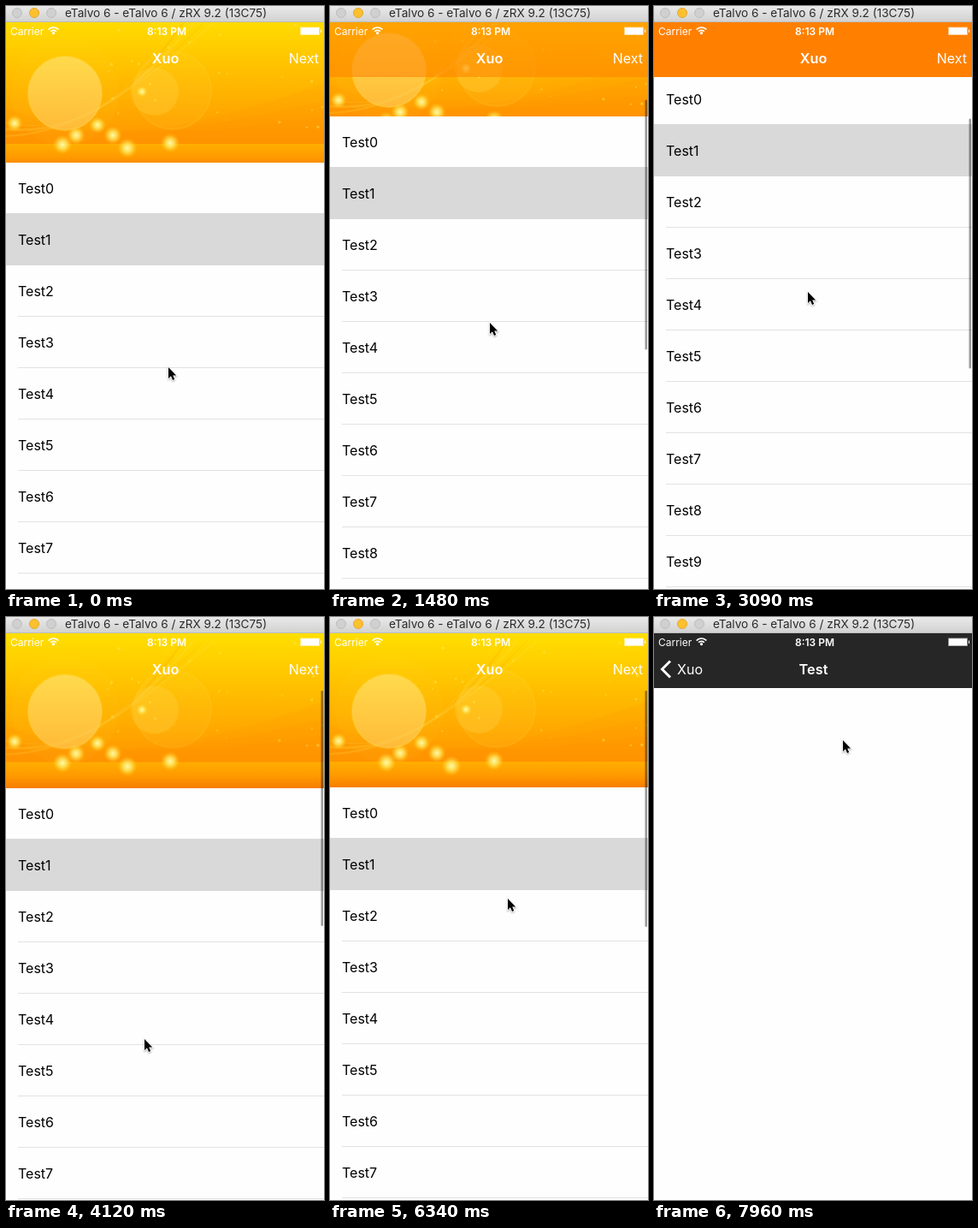
Animation of 372x681 px, one loop 8000 ms. Source, as an HTML page with a canvas:

```html
<!DOCTYPE html>
<html lang="en">
<head>
<meta charset="utf-8">
<title>Stretchy header list</title>
<style>
  html, body { margin: 0; width: 100%; height: 100%; overflow: hidden; background: #fefefe; }
  canvas { display: block; }
</style>
</head>
<body>
<canvas id="stage" width="372" height="681"></canvas>
<script>
const W = 372, H = 681, LOOP = 8000, STEP = 147.3;
const STATUS_TOP = 19, BAR_BOTTOM = 83, REST_TOP = 183, ROW = 60, ROWS = 20;
const FONT = 'Inter, Roboto, sans-serif';
const ctx = document.getElementById('stage').getContext('2d');

// The turning points of the gestures; everything eases from one to the next.
const POSES = [
  { time: 0, top: REST_TOP, x: 190, y: 422 },
  { time: 1480, top: 129, x: 187, y: 370 },
  { time: 3090, top: 79, x: 180, y: 334 },
  { time: 4120, top: 200, x: 162, y: 493 },
  { time: 5600, top: -400, x: 191, y: 216 },
  { time: 6340, top: 199, x: 208, y: 329 },
  { time: 7050, top: REST_TOP, x: 348, y: 62 },
  { time: LOOP - 40, top: REST_TOP, x: 221, y: 144 },
];

const clamp = v => Math.min(1, Math.max(0, v));
const ease = (t, from, to) => {
  const u = clamp((t - from) / (to - from));
  return u * u * (3 - 2 * u);
};

function poseAt(t) {
  const next = Math.max(1, POSES.findIndex(p => p.time > t));
  const b = t >= LOOP - 40 ? POSES[POSES.length - 1] : POSES[next];
  const a = POSES[POSES.indexOf(b) - 1];
  const k = ease(t, a.time, b.time);
  const mix = key => Math.round(a[key] + (b[key] - a[key]) * k);
  return { top: mix('top'), x: mix('x'), y: mix('y') };
}

function text(str, x, y, size, color, weight = 400, align = 'left') {
  ctx.font = `${weight} ${size}px ${FONT}`;
  ctx.textAlign = align;
  ctx.fillStyle = color;
  ctx.fillText(str, x, y);
}

function rect(x, y, w, h, fill) {
  ctx.fillStyle = fill;
  ctx.fillRect(x, y, w, h);
}

function disc(c, x, y, r, fill, stroke) {
  c.beginPath();
  c.arc(x, y, r, 0, 7);
  c.fillStyle = fill;
  c.fill();
  if (stroke) { c.strokeStyle = stroke; c.stroke(); }
}

function verticalGradient(c, from, to, ...colors) {
  const g = c.createLinearGradient(0, from, 0, to);
  colors.forEach((color, i) => g.addColorStop(i / (colors.length - 1), color));
  return g;
}

function glow(c, x, y, r) {
  const g = c.createRadialGradient(x, y, 0, x, y, r);
  g.addColorStop(0, 'rgba(255,255,180,.95)');
  g.addColorStop(.45, 'rgba(255,236,100,.75)');
  g.addColorStop(1, 'rgba(255,205,30,0)');
  disc(c, x, y, r, g);
}

const IMAGE_TOP = -20, HORIZON = 161, IMAGE_BOTTOM = 193;
const header = makeHeader();

function makeHeader() {
  const image = document.createElement('canvas');
  image.width = W;
  image.height = IMAGE_BOTTOM - IMAGE_TOP;
  const c = image.getContext('2d');
  c.translate(0, -IMAGE_TOP);
  c.fillStyle = verticalGradient(c, 5, HORIZON, '#ffe200', '#ffc800', '#ffaf00', '#ff9500');
  c.fillRect(0, IMAGE_TOP, W, HORIZON - IMAGE_TOP);
  c.fillStyle = verticalGradient(c, HORIZON, IMAGE_BOTTOM, '#ffae00', '#ff9a00', '#f57a00');
  c.fillRect(0, HORIZON, W, IMAGE_BOTTOM - HORIZON);

  // Swells rising to the right, darker with each layer
  for (let i = 0; i < 3; i++) {
    c.fillStyle = 'rgba(255,138,0,.13)';
    c.beginPath();
    c.moveTo(0, 118 + i * 14);
    c.bezierCurveTo(120, 170 - i * 10, 230, 140 + i * 5, W, 90 + i * 20);
    c.lineTo(W, HORIZON);
    c.lineTo(0, HORIZON);
    c.fill();
  }

  // Rays sweeping up from the left
  for (let i = 0; i < 5; i++) {
    c.strokeStyle = i % 2 ? 'rgba(240,150,0,.2)' : 'rgba(255,225,80,.2)';
    c.lineWidth = 1 + i % 3;
    c.beginPath();
    c.moveTo(0, 136 + i * 4);
    c.bezierCurveTo(70, 150, 135, 128 - i * 4, 195 + i * 12, 20);
    c.stroke();
  }

  // Sun and lens rings
  c.lineWidth = 2;
  disc(c, 69, 100, 63, 'rgba(255,220,60,.06)');
  disc(c, 69, 102, 43, verticalGradient(c, 59, 145, 'rgba(255,222,95,.8)', 'rgba(255,200,85,.65)'),
    'rgba(255,215,80,.4)');
  disc(c, 195, 99, 45, 'rgba(255,210,60,.12)', 'rgba(255,220,90,.12)');
  disc(c, 174, 100, 28, 'rgba(255,215,80,.28)');

  // Lights grow towards the horizon
  [[159, 100], [107, 139], [125, 151], [82, 151], [66, 162], [142, 166], [192, 160], [10, 137]]
    .forEach(([x, y]) => glow(c, x, y, 7 + (y - 100) / 14));

  let seed = 11;
  const random = () => (seed = seed * 16807 % 2147483647) / 2147483647;
  for (let i = 0; i < 30; i++) {
    disc(c, 120 + random() * 250, 22 + random() * 120, .5 + random() * 1.5,
      'rgba(255,232,90,.45)');
  }
  return image;
}

function drawList(top, barOpacity) {
  if (top > STATUS_TOP) {
    ctx.save();
    ctx.beginPath();
    ctx.rect(0, STATUS_TOP, W, top - STATUS_TOP);
    ctx.clip();
    ctx.drawImage(header, 0, IMAGE_TOP + (top - REST_TOP) / 2);
    ctx.restore();
  }
  for (let i = 0; i < ROWS; i++) {
    const y = top + i * ROW;
    if (i === 1) rect(0, y - 1, W, ROW + 1, '#d9d9d9');
    else if (i > 1) rect(14, y + ROW - 1, W - 14, 1, '#e2e2e4');
    text('Test' + i, 14, y + 36, 16, '#000');
  }
  const scrolled = REST_TOP - top;
  ctx.fillStyle = `rgba(0,0,0,${.4 * barOpacity})`;
  ctx.beginPath();
  ctx.roundRect(368.5, 86 + Math.max(0, scrolled) * .437, 2.5, 292 + Math.min(0, scrolled), 1.25);
  ctx.fill();
}

function drawStatus() {
  text('Carrier', 5, 33.5, 12, '#fff');
  ctx.strokeStyle = '#fff';
  ctx.lineWidth = 1.7;
  for (const r of [4.4, 7.7]) {
    ctx.beginPath();
    ctx.arc(55.5, 32.7, r, -Math.PI * .77, -Math.PI * .23);
    ctx.stroke();
  }
  disc(ctx, 55.5, 31.7, 1.6, '#fff');
  text('8:13 PM', 188, 33.5, 12, '#fff', 600, 'center');
  rect(344, 24.5, 23, 9.5, 'rgba(255,255,255,.5)');
  rect(345, 25.3, 21, 8, '#fff');
  rect(368, 27.5, 1, 3.5, '#fff');
}

function drawNavigation(push) {
  ctx.globalAlpha = 1 - push;
  text('Xuo', 186.5 - push * 130, 67, 16.3, '#fff', 600, 'center');
  text('Next', 366, 67, 16, '#fff', 400, 'right');
  ctx.globalAlpha = push;
  ctx.strokeStyle = '#fff';
  ctx.lineWidth = 3;
  ctx.stroke(new Path2D('M19 51.5L9.5 61L19 70.5'));
  text('Xuo', 27 + (1 - push) * 130, 67, 16, '#fff');
  text('Test', 186.5 + (1 - push) * 150, 67, 16.3, '#fff', 600, 'center');
  ctx.globalAlpha = 1;
}

function drawWindowBar() {
  rect(0, 0, W, 18, verticalGradient(ctx, 0, 18, '#e9e9e9', '#d2d2d2'));
  rect(0, 18, W, 1, '#bcbcbc');
  ctx.lineWidth = 1;
  for (let i = 0; i < 3; i++) {
    const [fill, edge] = i === 1 ? ['#fdc02f', '#e5a928'] : ['#d0d0d0', '#bdbdbd'];
    disc(ctx, 13 + i * 20, 8, 5.5, fill, edge);
  }
  text('eTalvo 6 - eTalvo 6 / zRX 9.2 (13C75)', 69, 13, 13.6, '#2a2a2a');
}

const ARROW = new Path2D('M0 0V13L3 10.2L5 15L7.2 14L5.2 9.4H9.2Z');

function drawPointer(x, y) {
  ctx.save();
  ctx.translate(x, y);
  ctx.shadowColor = 'rgba(0,0,0,.35)';
  ctx.shadowBlur = 2;
  ctx.shadowOffsetY = 1;
  ctx.strokeStyle = '#fff';
  ctx.lineWidth = 1.6;
  ctx.stroke(ARROW);
  ctx.shadowColor = 'transparent';
  ctx.fillStyle = '#000';
  ctx.fill(ARROW);
  ctx.restore();
}

function draw(t) {
  const { top, x, y } = poseAt(t);
  const push = ease(t, 7200, 7650);
  const barOpacity = ease(t, 140, 300) - ease(t, 6650, 6950);
  rect(0, 0, W, H, '#fefefe');

  ctx.save();
  ctx.translate(-push * W * .3, 0);
  drawList(top, barOpacity);
  ctx.restore();

  const tint = clamp((REST_TOP - top) / 100);
  rect(0, STATUS_TOP, W, BAR_BOTTOM - STATUS_TOP, `rgba(255,128,0,${tint})`);
  if (push > 0) {
    rect((1 - push) * W, STATUS_TOP, W, H, '#fefefe');
    rect(0, STATUS_TOP, W, BAR_BOTTOM - STATUS_TOP, `rgba(38,38,38,${push})`);
  }
  drawStatus();
  drawNavigation(push);
  drawWindowBar();
  drawPointer(x, y);
}

// The screen refreshes in steps, as a recording does.
const start = performance.now();
function tick() {
  const t = (performance.now() - start) % LOOP;
  draw(Math.floor((t + 8) / STEP) * STEP);
  requestAnimationFrame(tick);
}
tick();
</script>
</body>
</html>
```
